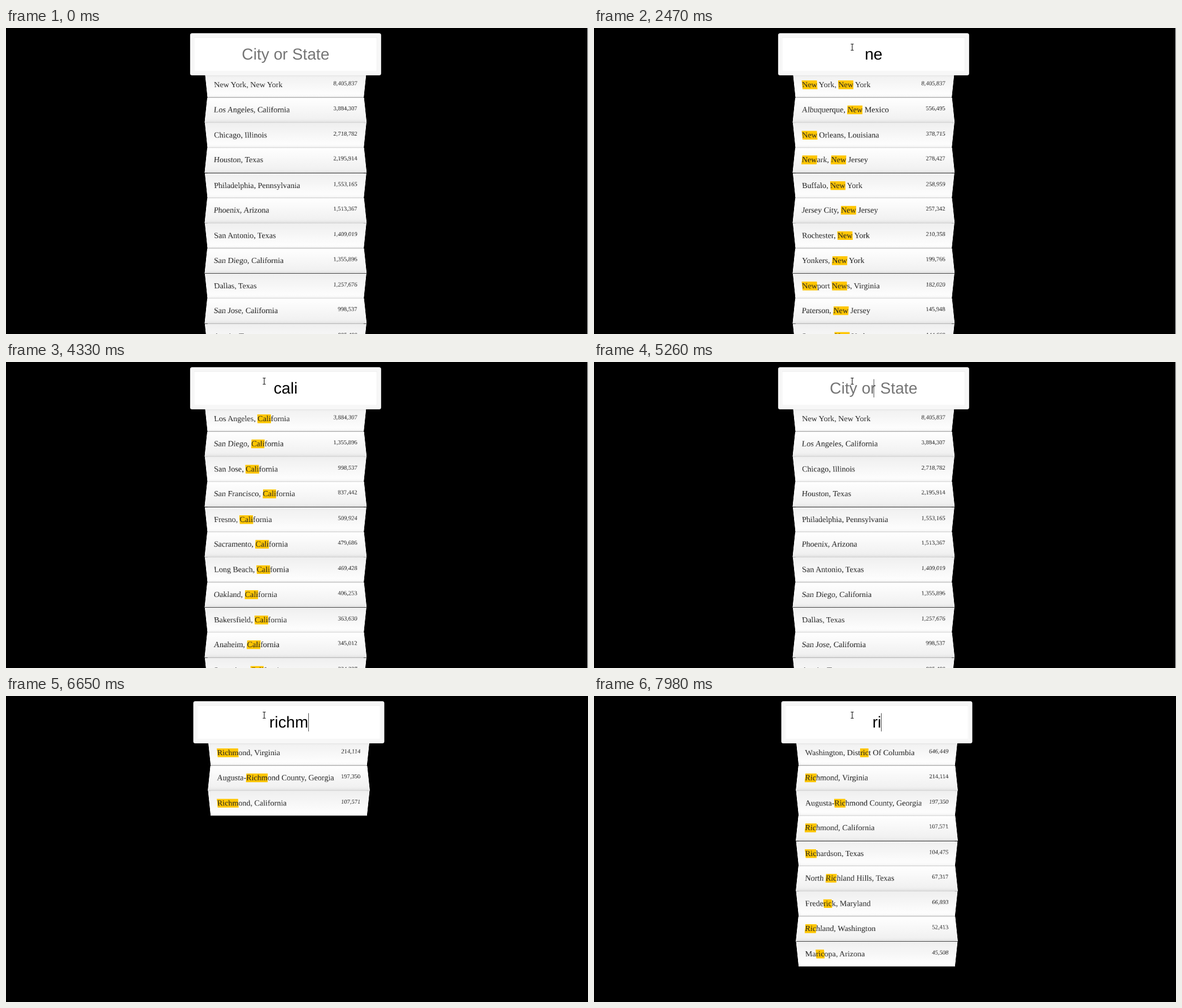
An HTML page that plays this animation: 1030 px wide and 543 px high, repeating every 8 s.

```html
<!DOCTYPE html>
<html lang="en">
<head>
<meta charset="utf-8">
<title>City search</title>
<style>
  html, body { margin: 0; width: 100%; height: 100%; overflow: hidden; background: #000; }
  #stage { position: relative; width: 1030px; height: 543px; overflow: hidden; background: #000; }
  #bar { position: absolute; right: 0; top: 0; width: 1px; height: 100%; background: #f1f1f1; }
  #form {
    position: absolute; left: 0; top: 0; width: 400px;
    transform-origin: 0 0; text-rendering: geometricPrecision; white-space: nowrap;
  }
  #search {
    position: absolute; left: -40px; top: 10px; z-index: 2; box-sizing: border-box;
    width: 480px; height: 106px; padding: 20px; border: 10px solid #f7f7f7; border-radius: 5px;
    background: #fff; text-align: center; font: 40px/46px "Liberation Sans", Arial, sans-serif;
    box-shadow: 0 0 5px rgba(0,0,0,.12), inset 0 0 2px rgba(0,0,0,.19);
  }
  #value { position: relative; display: inline-block; height: 46px; }
  #value.empty { color: #757575; }
  #value.caret::after {
    content: ""; position: absolute; left: 100%; top: 0; width: 1px; height: 46px; background: #000;
  }
  #value.empty.caret::after { left: 50%; }
  #list {
    position: absolute; left: 0; top: 106.4px; width: 400px; margin: 0; padding: 0;
    font: 20px/22.667px "Liberation Serif", "Times New Roman", serif; color: #222;
  }
  /* Backing that keeps the folds from showing black. */
  #list::before {
    content: ""; position: absolute; inset: 0 4px; z-index: -1; background: #bbb;
  }
  li {
    display: flex; justify-content: space-between; box-sizing: border-box; height: 63.333px;
    padding: 20px 20px 0; list-style: none; border-bottom: 1px solid #d8d8d8;
    box-shadow: 0 0 10px rgba(0,0,0,.14);
  }
  li:nth-child(odd) {
    transform: perspective(100px) rotateX(-3deg) translateY(3px);
    background: linear-gradient(to top, #fff, #efefef);
  }
  li:nth-child(even) {
    transform: perspective(100px) rotateX(3deg) translateY(2px) scale(1.001);
    background: linear-gradient(to bottom, #fff, #efefef);
  }
  .count { font-size: 15px; line-height: 17px; }
  .hl { background: #ffc600; }
  .seam { position: absolute; width: 286px; height: 1px; background: rgba(0,0,0,.65); }
  #mouse { position: absolute; left: 0; top: 0; width: 30px; height: 30px; overflow: visible; }
</style>
</head>
<body>
<div id="stage">
  <div id="bar"></div>
  <div id="form">
    <div id="search"><span id="value"></span></div>
    <ul id="list"></ul>
  </div>
  <div class="seam" style="top:257px"></div>
  <div class="seam" style="top:435px"></div>
  <svg id="mouse">
    <path id="beam" d="M-2.5-5.5H-.6L0-5 .6-5.5H2.5M0-5V5M-2.5 5.5H-.6L0 5 .6 5.5H2.5" fill="none" stroke="#111" stroke-width="1.1"/>
    <path id="arrow" d="M0 0V12L2.8 9.4 4.6 13.4 6.4 12.6 4.6 8.7H8.3Z" fill="#fff" stroke="#000" stroke-width=".7"/>
  </svg>
</div>
<script>
const LOOP = 8000, SCALE = 0.7042, TOP = 2.3;

// Sorted by population, largest first.
const places = `New York, New York 8,405,837
Los Angeles, California 3,884,307
Chicago, Illinois 2,718,782
Houston, Texas 2,195,914
Philadelphia, Pennsylvania 1,553,165
Phoenix, Arizona 1,513,367
San Antonio, Texas 1,409,019
San Diego, California 1,355,896
Dallas, Texas 1,257,676
San Jose, California 998,537
Austin, Texas 885,400
Indianapolis, Indiana 843,393
Jacksonville, Florida 842,583
San Francisco, California 837,442
Columbus, Ohio 822,553
Charlotte, North Carolina 792,862
Fort Worth, Texas 792,727
Detroit, Michigan 688,701
Memphis, Tennessee 653,450
Denver, Colorado 649,495
Washington, District Of Columbia 646,449
Nashville-Davidson, Tennessee 634,464
Las Vegas, Nevada 603,488
Albuquerque, New Mexico 556,495
Tucson, Arizona 526,116
Fresno, California 509,924
Sacramento, California 479,686
Long Beach, California 469,428
Kansas City, Missouri 467,007
Mesa, Arizona 457,587
Colorado Springs, Colorado 439,886
Omaha, Nebraska 434,353
Raleigh, North Carolina 431,746
Miami, Florida 417,650
Oakland, California 406,253
Minneapolis, Minnesota 400,070
New Orleans, Louisiana 378,715
Bakersfield, California 363,630
Tampa, Florida 352,957
Anaheim, California 345,012
Santa Ana, California 334,227
St. Louis, Missouri 318,416
Riverside, California 316,619
St. Paul, Minnesota 294,873
Newark, New Jersey 278,427
Henderson, Nevada 270,811
Buffalo, New York 258,959
Jersey City, New Jersey 257,342
Richmond, Virginia 214,114
Rochester, New York 210,358
Yonkers, New York 199,766
Augusta-Richmond County, Georgia 197,350
Newport News, Virginia 182,020
Paterson, New Jersey 145,948
Syracuse, New York 144,669
Richmond, California 107,571
Richardson, Texas 104,475
North Richland Hills, Texas 67,317
Frederick, Maryland 66,893
Richland, Washington 52,413
Maricopa, Arizona 45,508`.split("\n").map(line => {
  const cut = line.lastIndexOf(" ");
  return { name: line.slice(0, cut), count: line.slice(cut + 1) };
});

// [time, typed text ("|" = visible caret), query the list shows]
const steps = [
  [0, "", ""], [840, "|", ""], [1390, "", ""],
  [1700, "n|", ""], [1930, "new|", "ne"], [2010, "new|", "new"],
  [2470, "ne", "new"], [2540, "n", "ne"], [2620, "n", "n"], [2850, "", ""],
  [3160, "c|", ""], [3230, "c|", "c"], [3310, "ca|", "c"], [3480, "cal|", "ca"],
  [3710, "cali|", "cal"], [3780, "calio|", "calio"], [4180, "cali|", "calio"], [4330, "cali", "cali"],
  [4870, "cal|", "cali"], [4950, "ca|", "cal"], [5030, "c|", "ca"], [5100, "|", "ca"],
  [5180, "|", "c"], [5260, "|", ""],
  [5410, "r|", ""], [5490, "r|", "r"], [5790, "ri|", "r"], [5880, "ri|", "ri"],
  [6110, "ric|", "ri"], [6260, "rich|", "ric"], [6340, "rich|", "rich"],
  [6570, "richm|", "rich"], [6650, "richm|", "richm"], [6730, "richmon|", "richmo"],
  [6800, "richmon|", "richmon"], [6970, "richmond|", "richmon"], [7040, "richmond|", "richmond"],
  [7290, "richmon|", "richmond"], [7370, "richmon|", "richmon"], [7440, "richmo|", "richmon"],
  [7520, "richm|", "richmo"], [7600, "richm|", "richm"], [7670, "rich|", "richm"],
  [7750, "rich|", "rich"], [7830, "ric|", "rich"], [7900, "ric|", "ric"], [7980, "ri|", "ric"]
];

// [time, x, y]
const mousePath = [
  [0, 0, -99], [70, 940, 530], [150, 905, 470], [230, 815, 350], [300, 695, 215], [380, 590, 110],
  [460, 518, 48], [540, 478, 22], [610, 463, 20], [690, 460, 32],
  [840, 452, 31], [940, 455, 33], [1040, 457, 34]
];

const $ = id => document.getElementById(id);
const value = $("value"), list = $("list"), form = $("form"), mouse = $("mouse");
const seams = [...document.querySelectorAll(".seam")];
const at = (table, t) => table.findLast(row => row[0] <= t);

function showList(query) {
  const match = new RegExp(query, "gi");
  const found = places.filter(p => p.name.search(match) >= 0).slice(0, 11);
  list.innerHTML = found.map(p => {
    const name = query ? p.name.replace(match, '<span class="hl">$&</span>') : p.name;
    return `<li><span>${name}</span><span class="count">${p.count}</span></li>`;
  }).join("");

  // A long list brings the scrollbar, which shifts the centre.
  const scrolls = found.length > 9;
  const center = scrolls ? 494.85 : 500.5;
  $("bar").style.display = scrolls ? "" : "none";
  form.style.transform = `translate(${center - 200 * SCALE}px, ${TOP}px) scale(${SCALE})`;
  seams.forEach((seam, i) => {
    seam.style.left = center - 143 + "px";
    seam.style.display = found.length > 4 * (i + 1) ? "" : "none";
  });
}

function showText(text) {
  const typed = text.replace("|", "");
  value.textContent = typed || "City or State";
  value.classList.toggle("empty", !typed);
  value.classList.toggle("caret", text.endsWith("|"));
}

function showMouse([, x, y]) {
  const inInput = x > 326 && x < 664 && y > 9 && y < 84;
  mouse.style.transform = `translate(${x}px, ${y}px)`;
  $("beam").style.display = inInput ? "" : "none";
  $("arrow").style.display = inInput ? "none" : "";
}

let lastStep, lastQuery, lastMouse;
function draw() {
  const t = performance.now() % LOOP;
  const step = at(steps, t), point = at(mousePath, t);
  if (step !== lastStep) showText(step[1]);
  if (step[2] !== lastQuery) showList(step[2]);
  if (point !== lastMouse) showMouse(point);
  [lastStep, lastQuery, lastMouse] = [step, step[2], point];
  requestAnimationFrame(draw);
}
draw();
</script>
</body>
</html>
```
